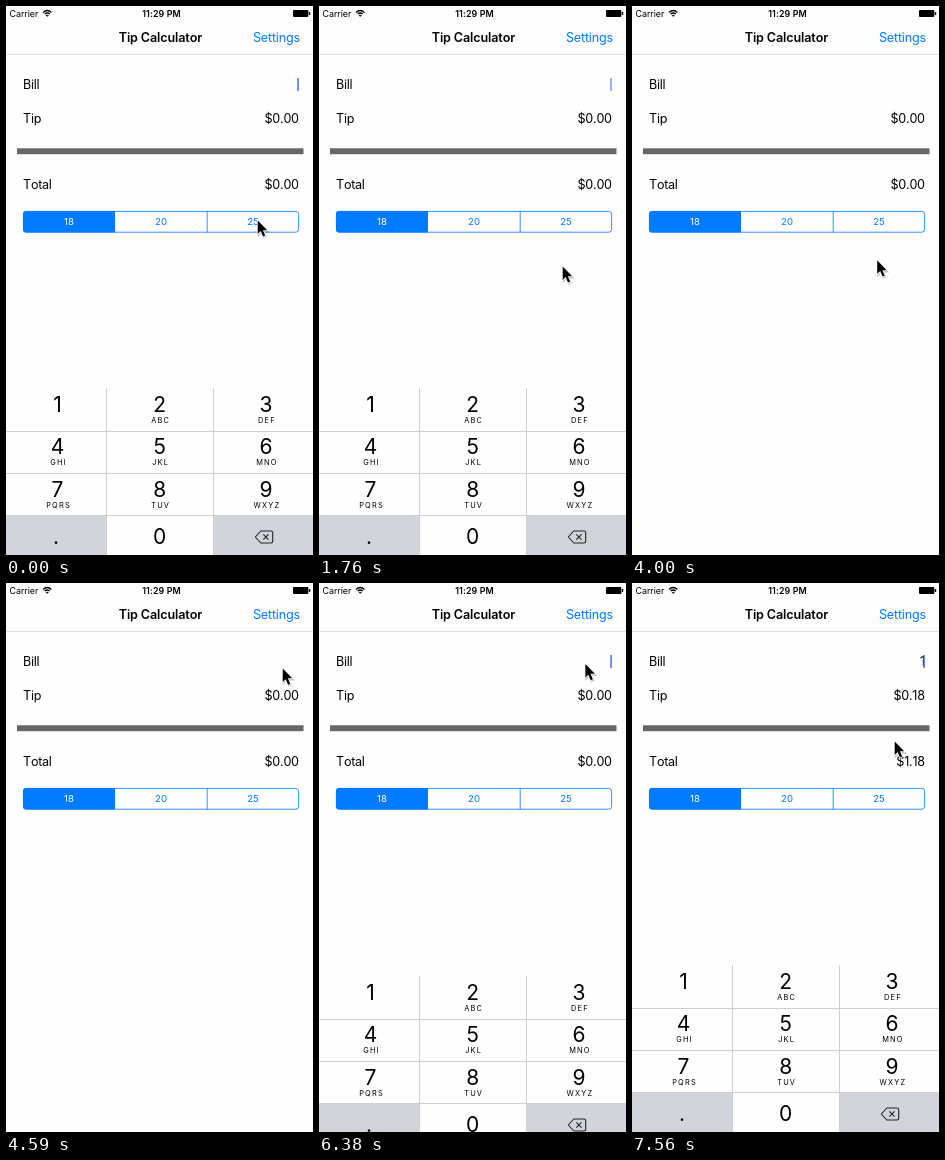
Animation, 307 px wide and 549 px high, one loop 8000 ms. Source, as an HTML page:

```html
<!DOCTYPE html>
<html lang="en">
<head>
<meta charset="utf-8">
<title>Tip Calculator</title>
<style>
  html, body { margin: 0; width: 100%; height: 100%; overflow: hidden; background: #fefefe; }
  svg { display: block; width: 100%; height: 100%; }
  text { font: 12.6px Inter, sans-serif; letter-spacing: -.25px; font-kerning: none; }
  .mid { text-anchor: middle; }
  .end { text-anchor: end; }
  .title { font-weight: 600; letter-spacing: -.13px; }
  .link { letter-spacing: -.18px; }
  .status { font-size: 8.9px; letter-spacing: 0; }
  .clock { font-weight: 600; letter-spacing: .1px; }
  .segment { font-size: 9.6px; letter-spacing: 0; }
  .digit { font-size: 21px; letter-spacing: 0; }
  .letters { font-size: 7.4px; letter-spacing: 1.2px; }
  .blue { fill: #007aff; }
  .frame { fill: none; stroke: #007aff; stroke-width: .8; }
</style>
</head>
<body>
<svg viewBox="0 0 307 549">
  <rect width="307" height="48" fill="#fdfdfd"/>
  <rect y="48" width="307" height="1" fill="#dedede"/>

  <text class="status" x="3.5" y="11.2">Carrier</text>
  <g fill="none" stroke="#000" stroke-width="1.3">
    <path d="M37 6.4Q41.2 2.6 45.4 6.4M38.7 8.1Q41.2 5.9 43.7 8.1"/>
    <path d="M40 9.3L41.2 10.5 42.4 9.3Z" fill="#000" stroke-width=".6"/>
  </g>
  <text class="status clock mid" x="155.5" y="11.2">11:29 PM</text>
  <rect x="287" y="4" width="15.3" height="7" rx="1"/>
  <rect x="302.8" y="6" width="1.4" height="3" rx=".6"/>

  <text class="title mid" x="154.4" y="36">Tip Calculator</text>
  <text class="link blue end" x="294" y="36">Settings</text>

  <text x="17" y="82.6">Bill</text>
  <text x="17" y="116.8">Tip</text>
  <text x="17" y="183">Total</text>
  <text class="end" id="bill" x="292.8" y="82.6"></text>
  <text class="end" id="tip" x="292.8" y="116.8"></text>
  <text class="end" id="total" x="292.8" y="183"></text>
  <rect x="11" y="142.3" width="286.5" height="5.9" fill="#666"/>
  <rect id="caret" x="291.3" y="72" width="1.5" height="13" fill="#426bf2"/>

  <path class="blue" d="M109 205H20Q17 205 17 208V223.6Q17 226.6 20 226.6H109Z"/>
  <rect class="frame" x="17.4" y="205.4" width="275.2" height="20.8" rx="2.8"/>
  <path class="frame" d="M201.2 205V226.6"/>
  <text class="segment mid" x="63" y="219.4" fill="#fff">18</text>
  <text class="segment blue mid" x="155" y="219.4">20</text>
  <text class="segment blue mid" x="247" y="219.4">25</text>

  <g id="keypad">
    <rect y="382" width="307" height="180" fill="#fefefe"/>
    <path d="M0 509H100V562H0ZM208 509H307V562H208Z" fill="#d1d5db"/>
    <path d="M100.5 382V562M207.5 382V562M0 425.5H307M0 467.5H307M0 509.5H307" stroke="#cfd0d3"/>
    <g id="keys"></g>
    <g fill="none" stroke="#222" stroke-width="1.1" stroke-linejoin="round">
      <path d="M254.8 525H265Q266.7 525 266.7 526.7V535.3Q266.7 537 265 537H254.8L249.3 531Z"/>
      <path d="M257.3 528.4L262.5 533.6M262.5 528.4L257.3 533.6"/>
    </g>
  </g>

  <g id="pointer">
    <path d="M.8 1.8V15L3.8 12.3 6 17.3 8.3 16.3 6.1 11.3H10.3Z" opacity=".22" stroke="#000" stroke-width="1.6"/>
    <path d="M0 0V13.5L3 10.7 5.3 16.2 7.5 15.2 5.2 9.8H9.5Z" stroke="#fff" stroke-width="1.6" stroke-linejoin="round" paint-order="stroke"/>
  </g>
</svg>
<script>
const LOOP = 8000, BLUR = 2200, FOCUS = 6380, TYPED = 7560;
const TICK = 147.5;   // the screen is sampled this often
const BLINK = 1030;
const $ = id => document.getElementById(id);

const clamp = v => Math.min(1, Math.max(0, v));
const easeOut = p => 1 - (1 - clamp(p)) ** 1.6;
const hold = t => Math.floor(t / TICK) * TICK;
const money = amount => "$" + amount.toFixed(2);

// Strokes of the mouse: start, duration, destination
const moves = [
  [1312, 165, 242, 264], [1475, 140, 242, 260],
  [3975, 310, 281, 102], [4280, 300, 275, 85],
  [5530, 260, 263, 82], [6290, 440, 272, 74], [6830, 100, 261, 158]
];

function pointerAt(t) {
  let x = 250, y = 214;
  for (const [start, duration, toX, toY] of moves) {
    const p = easeOut((t - start) / duration);
    x += (toX - x) * p;
    y += (toY - y) * p;
  }
  return [x, y];
}

const caretOpacity = age => clamp(1.1 + 1.3 * Math.cos(2 * Math.PI * (age - 10) / BLINK));
const keypadOffset = age => 11 * Math.exp(-hold(age) / 62);

function addKey(x, baseline, digit, letters = "") {
  $("keys").innerHTML +=
    `<text class="digit mid" x="${x}" y="${baseline}">${digit}</text>` +
    `<text class="letters mid" x="${x + 1}" y="${baseline + 11}">${letters}</text>`;
}

["", "ABC", "DEF", "GHI", "JKL", "MNO", "PQRS", "TUV", "WXYZ"].forEach((letters, i) =>
  addKey(51.5 + 104.2 * (i % 3) - i % 3 % 2 * 2, 406 + 42.3 * Math.floor(i / 3), i + 1, letters));
addKey(50, 538, ".");
addKey(153.7, 538, 0);

function draw(t) {
  const editing = t < BLUR || t >= FOCUS;
  const age = t < FOCUS ? t : t - FOCUS;
  const bill = t < TYPED ? 0 : 1;
  const [x, y] = pointerAt(hold(t));

  $("pointer").setAttribute("transform", `translate(${x + 1.7} ${y + .4})`);
  $("keypad").setAttribute("visibility", editing ? "visible" : "hidden");
  $("keypad").setAttribute("transform", `translate(0 ${t < FOCUS ? 0 : keypadOffset(age)})`);
  $("caret").setAttribute("opacity", editing ? caretOpacity(age) : 0);
  $("bill").textContent = bill || "";
  $("tip").textContent = money(bill * .18);
  $("total").textContent = money(bill * 1.18);
}

const start = performance.now();
function frame() {
  draw((performance.now() - start) % LOOP);
  requestAnimationFrame(frame);
}
frame();
</script>
</body>
</html>
```
